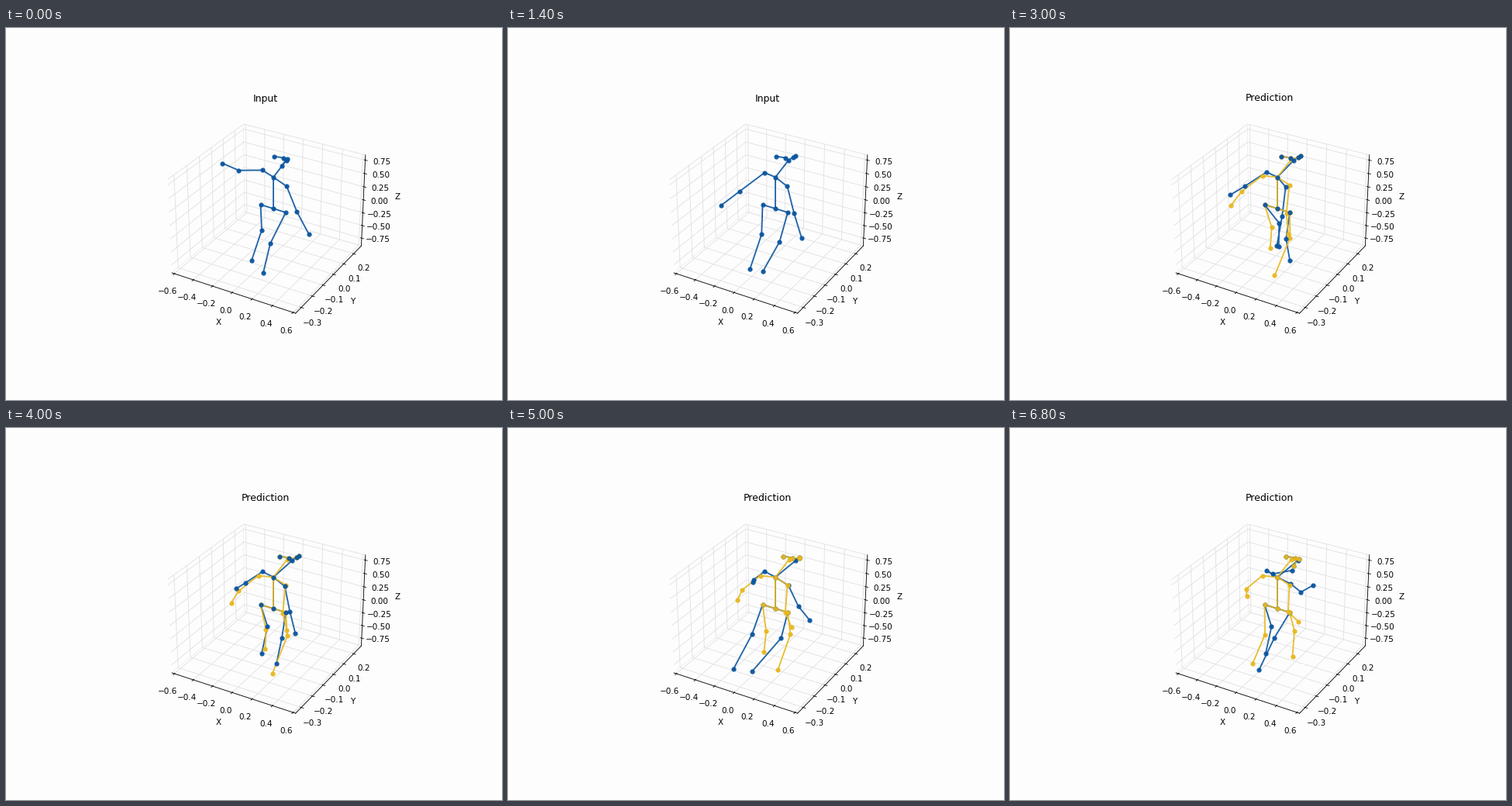
A matplotlib script for the animation above (7 s loop, 640 by 480 pixels).

```python
import numpy as np
import matplotlib.pyplot as plt
from matplotlib.animation import FuncAnimation

W, H, DPI = 640, 480, 75
FRAMES, STEP = 35, 200
PREDICT_FROM = 10      # first predicted frame
SWAP_AT = 22           # from here the prediction's dots lie in front
BLUE, YELLOW, PAPER = "#0b559f", "#e8b820", "#fdfdfd"

# Joints that stay in place, in pixels
FIXED = {
    "neck": (345, 192.5),
    "pelvis": (345, 233),
    "r_hip": (328.5, 228),
    "l_hip": (361, 238),
}
CHAINS = [
    "r_ear r_eye nose l_eye l_ear",
    "nose neck pelvis",
    "r_wrist r_elbow r_shoulder neck l_shoulder l_elbow l_wrist",
    "r_ankle r_knee r_hip pelvis l_hip l_knee l_ankle",
]


def vec(x, y):
    return np.array([x, y], float)


def smooth(s):
    s = np.clip(s, 0, 1)
    return s * s * (3 - 2 * s)


def mix(a, b, share):
    return np.asarray(a) + (np.asarray(b) - a) * np.asarray(share)


def cycle(t, peak, period):
    return np.cos(2 * np.pi * (t - peak) / period)


def head(t):
    """The head leans forward while it turns away and back."""
    nose = vec(361.5 + 10 * smooth((t - 5) / 22), 171)
    turn = smooth(t / 7) * (1 - smooth((t - 20) / 14))
    return {
        "nose": nose,
        "r_eye": nose + (-4, -3.5),
        "r_ear": nose + (-16, -5.5),
        "l_eye": nose + mix((1, -2), (6, -4.5), turn),
        "l_ear": nose + mix((-6, 7), (9, -6.5), turn),
    }


def arms(t):
    """Wrists swing; elbows and shoulders follow them in part."""
    dip = np.exp(-((t - 14) / 6) ** 2)
    right = vec(275 + 89 * ((t - 6) / 28) ** 2,
                174.5 + 66 * smooth(t / 7) - 1.67 * t)
    left = vec(391 - 48 * dip, 266 - 63 * (t / 34) ** 4 + 18 * dip)
    return {
        "r_wrist": right,
        "r_elbow": mix((318, 193), right, (0.45, 0.5)),
        "r_shoulder": mix((331, 184), right, (0, 0.06)),
        "l_wrist": left,
        "l_elbow": mix((358.5, 217.5), left, (0.52, 0.4)),
        "l_shoulder": mix((357.5, 201), left, (0.14, 0.05)),
    }


def legs(t):
    """Each leg swings forward and lifts; the stride opens up at the start."""
    stride = smooth((t - 4) / 11)
    right, left = cycle(t, 16, 22), cycle(t, 16, 26)
    return {
        "r_knee": vec(330 + 18 * right * stride, 259.5 - 8 * right),
        "r_ankle": vec(317 + 31 * right * stride, 297.5 - 16 * right),
        "l_knee": vec(341 + 15.5 * np.sin(np.pi * t / 34), 278 - 7 * smooth(t / 20)),
        "l_ankle": vec(332 + 30 * left * stride, 309 - 9 * left),
    }


def true_pose(t):
    return {**FIXED, **head(t), **arms(t), **legs(t)}


def predicted_pose(t):
    """A stiffer figure that drifts from one pose to another; feet start late."""
    p = np.clip((t - PREDICT_FROM) / (FRAMES - 1 - PREDICT_FROM), 0, 1)
    return {
        **true_pose(t),
        "nose": vec(363, 169.5),
        "r_shoulder": vec(325.5, 190.5),
        "r_elbow": mix((297, 212), (305, 207.5), p),
        "r_wrist": mix((280, 232), (305.5, 216.5), p),
        "l_shoulder": vec(360.5, 202.5),
        "l_elbow": mix((356, 240), (359, 237), p),
        "l_wrist": mix((356, 270), (371.5, 249.5), p),
        "r_knee": mix((340, 255), (329, 266.5), p),
        "r_ankle": mix((336, 284), (313, 304), p ** 3),
        "l_knee": mix((360, 273), (367, 262), p),
        "l_ankle": mix((341, 320), (364.5, 294.5), p ** 2.5),
    }


plt.rcParams.update({
    "font.family": "DejaVu Sans",
    "grid.color": "#e0e0e0",
    "grid.linewidth": 0.8,
    "axes.linewidth": 0.8,
    "axes.labelpad": 5,
    "xtick.major.pad": 4.5,
    "ytick.major.pad": 4.5,
})
fig = plt.figure(figsize=(W / DPI, H / DPI), dpi=DPI, facecolor=PAPER)

# Empty 3D box with its grid
side, cx, cy = 284, 334.7, 244
box = fig.add_axes([(cx - side / 2) / W, 1 - (cy + side / 2) / H, side / W, side / H],
                   projection="3d", facecolor=PAPER)
box.set(xlim=(-0.625, 0.625), ylim=(-0.35, 0.28), zlim=(-0.905, 0.845),
        xlabel="X", ylabel="Y", zlabel="Z")
box.set_xticks(np.arange(-3, 4) / 5)
box.set_yticks(np.arange(-3, 3) / 10)
box.set_zticks(np.arange(-3, 4) / 4)
for axis in (box.xaxis, box.yaxis, box.zaxis):
    axis.pane.set_facecolor(PAPER)
    axis.pane.set_edgecolor("#e6e6e6")
    axis.pane.set_alpha(1)
title = fig.text(cx / W, 1 - 94.5 / H, "Input", fontsize=12, ha="center", va="baseline")

# Flat layer in pixels for the figures
stage = fig.add_axes([0, 0, 1, 1], zorder=5)
stage.set(xlim=(0, W), ylim=(H, 0))
stage.axis("off")


class Skeleton:
    def __init__(self, pose, color, z):
        self.pose = pose
        self.bones, = stage.plot([], [], color=color, lw=1.8, alpha=0.9, zorder=z)
        self.dots, = stage.plot([], [], "o", color=color, ms=6, mew=0, alpha=0.95)

    def show(self, t, dot_z, visible=True):
        joints = self.pose(t)
        points = []
        for chain in CHAINS:
            points += [joints[name] for name in chain.split()] + [(np.nan, np.nan)]
        self.bones.set_data(*np.array(points).T)
        self.dots.set_data(*np.array(list(joints.values())).T)
        self.dots.set_zorder(dot_z)
        self.bones.set_visible(visible)
        self.dots.set_visible(visible)


truth = Skeleton(true_pose, BLUE, 2)
prediction = Skeleton(predicted_pose, YELLOW, 3)


def draw(n):
    predicting = n >= PREDICT_FROM
    title.set_text("Prediction" if predicting else "Input")
    truth.show(n, 5)
    prediction.show(n, 6 if n >= SWAP_AT else 4, predicting)
    return []


anim = FuncAnimation(fig, draw, frames=FRAMES, interval=STEP, repeat=True,
                     repeat_delay=0, blit=False)
plt.show()
```
